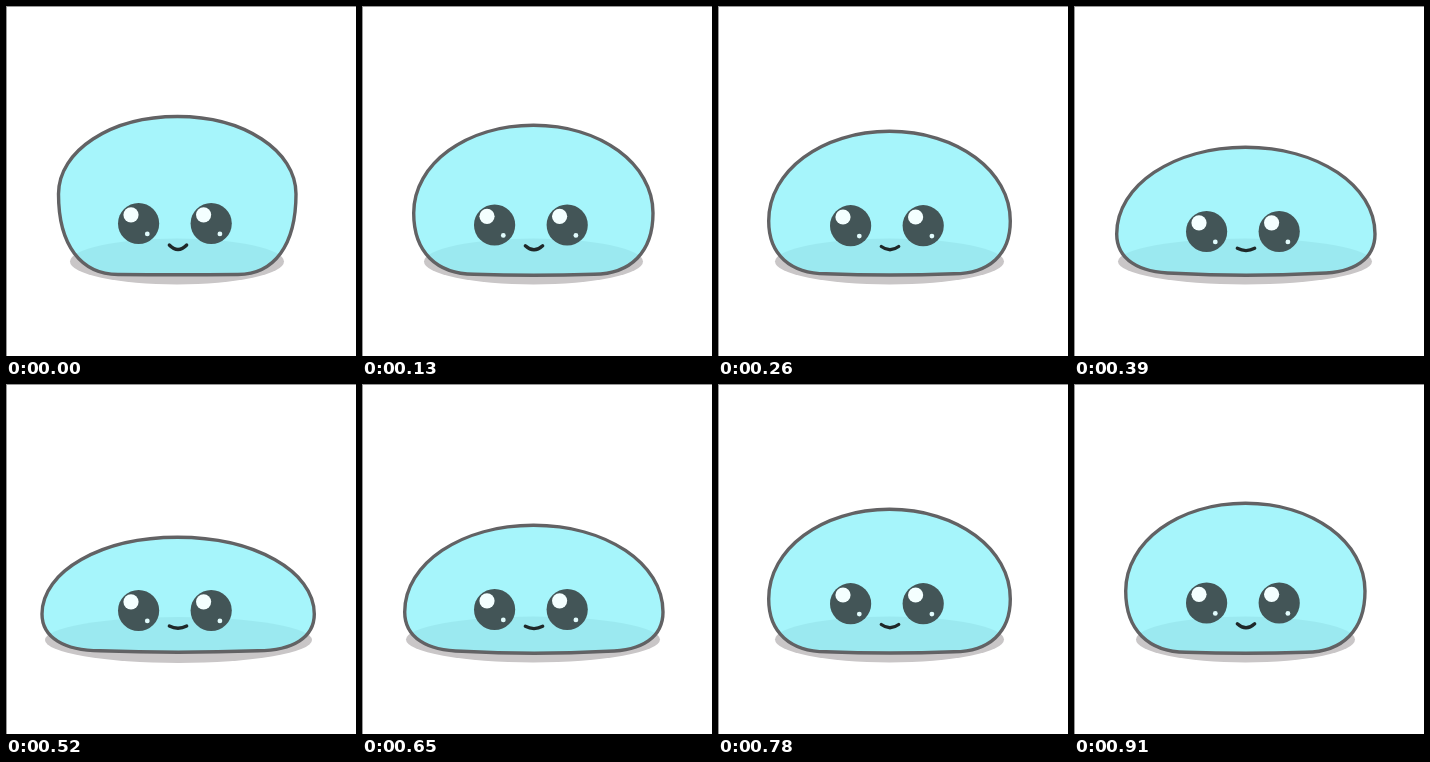
Recreate the animation shown at these times as an HTML page. Size 350 by 350 pixels, loop 1.04 s.

```html
<!DOCTYPE html>
<html lang="en">
<head>
<meta charset="utf-8">
<title>Jelly</title>
<style>
html, body { margin: 0; width: 100%; height: 100%; overflow: hidden; background: #fff; }
svg { display: block; width: 100vw; height: 100vh; }
</style>
</head>
<body>
<svg viewBox="0 0 350 350">
  <defs>
    <g id="eye">
      <circle r="20.6" fill="#435557"/>
      <circle cx="-7.6" cy="-8.7" r="7.6" fill="#f4ffff"/>
      <circle cx="8.7" cy="10.4" r="2.4" fill="#e2fbfc"/>
    </g>
  </defs>
  <rect width="350" height="350" fill="#fff"/>
  <path d="M0 .5H350M.5 0V350" stroke="#999" fill="none"/>
  <ellipse id="shadow" fill="#c9c6c7"/>
  <path id="body" fill="rgba(144,243,250,.8)" stroke="#626264" stroke-width="3.4" stroke-linejoin="round"/>
  <g id="eyes">
    <use href="#eye" x="132.6"/>
    <use href="#eye" x="205.2"/>
  </g>
  <path id="mouth" fill="none" stroke="#1f2829" stroke-width="3.3" stroke-linecap="round"/>
</svg>
<script>
const STEP = 130, COUNT = 8, CX = 171.5;
const $ = id => document.getElementById(id);

// Poses from tall to flat. foot: x and y where the sides meet the base; base: y at the middle.
const poses = [
  { top: 110.5, left: 52.5, right: 290, side: 188, foot: [112, 232, 268.5], base: 268.7, shade: [64, 278, 255.5], eye: 217.5, mouth: [239, 9] },
  { top: 119.3, left: 51.7, right: 291, side: 207, foot: [112, 232, 268.3], base: 269.3, shade: [62, 281, 255.5], eye: 219, mouth: [239.8, 8] },
  { top: 125.3, left: 50.7, right: 292.3, side: 215, foot: [108, 236, 267.8], base: 269, shade: [57, 286, 255.5], eye: 219.7, mouth: [240.5, 6.5] },
  { top: 141.3, left: 42.7, right: 301, side: 228, foot: [100, 246, 267.3], base: 269.2, shade: [44, 298, 255.5], eye: 225.5, mouth: [242.3, 4.5] },
  { top: 153.3, left: 36, right: 308.3, side: 230, foot: [94, 252, 266.8], base: 268.2, shade: [39, 306, 256], eye: 226.5, mouth: [242, 4.5] }
];

function outline({ top, left, right, side, foot: [fl, fr, fy], base }) {
  const k = 0.56, up = side - (side - top) * k, down = side + (fy - side) * 0.64;
  const lx = CX - (CX - left) * k, rx = CX + (right - CX) * k;
  const fl2 = fl - (fl - left) * 0.62, fr2 = fr + (right - fr) * 0.62;
  return `M${CX} ${top}C${rx} ${top} ${right} ${up} ${right} ${side}` +
    `C${right} ${down} ${fr2} ${fy - 0.4} ${fr} ${fy}` +
    `Q${CX} ${2 * base - fy} ${fl} ${fy}` +
    `C${fl2} ${fy - 0.4} ${left} ${down} ${left} ${side}` +
    `C${left} ${up} ${lx} ${top} ${CX} ${top}Z`;
}

function setAll(el, attrs) {
  for (const name in attrs) el.setAttribute(name, attrs[name]);
}

function draw(ms) {
  const step = Math.floor(ms / STEP) % COUNT;
  const pose = poses[step <= 4 ? step : COUNT - step];
  const [l, r, y] = pose.shade;
  const [my, depth] = pose.mouth;
  setAll($("shadow"), { cx: (l + r) / 2, cy: y, rx: (r - l) / 2, ry: 23 });
  setAll($("body"), { d: outline(pose) });
  setAll($("eyes"), { transform: `translate(0 ${pose.eye})` });
  setAll($("mouth"), { d: `M163.3 ${my}Q172 ${my + depth} 180.7 ${my}` });
}

let start;
function frame(now) {
  start ??= now;
  draw(Math.max(0, now - start));
  requestAnimationFrame(frame);
}
draw(0);
requestAnimationFrame(frame);
</script>
</body>
</html>
```
